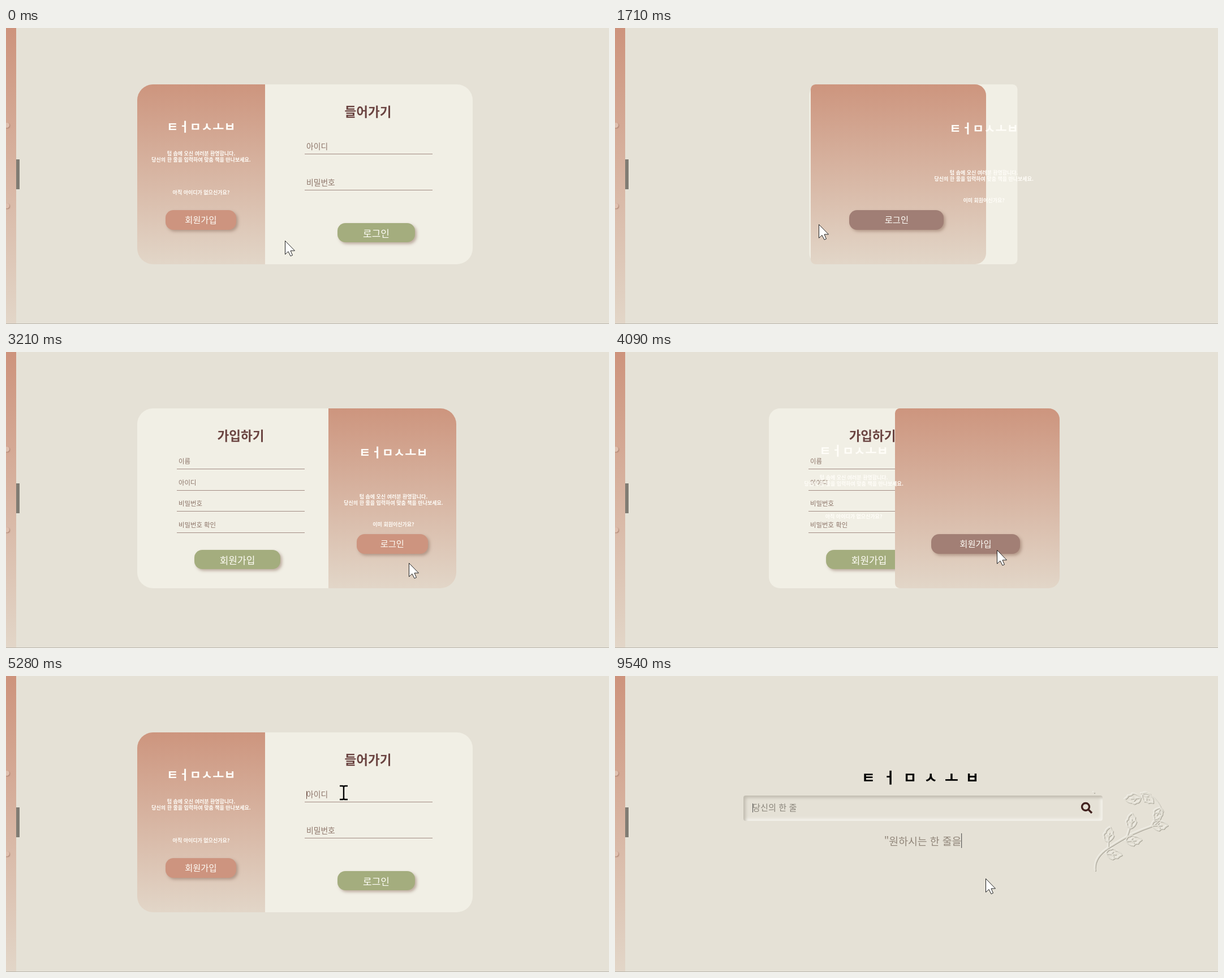
Animation, 1066 px wide and 525 px high, one loop 9570 ms. Source, as an HTML page:

```html
<!DOCTYPE html>
<html lang="ko">
<head>
<meta charset="utf-8">
<title>들어가기</title>
<style>
html, body { margin: 0; width: 100%; height: 100%; overflow: hidden; background: #e5e1d6; }
body { font: 9px/1 "Noto Sans CJK KR", "Noto Sans CJK", sans-serif; }
div, p, i, b, svg { position: absolute; margin: 0; box-sizing: border-box; }
p { white-space: nowrap; transform: translate(-50%, -50%); }
.l { transform: translate(0, -50%); }
#bar { left: 0; top: 0; width: 18px; height: 525px; background: linear-gradient(#cd937c, #e2d6c8); overflow: hidden; }
#bar i { left: -3px; width: 9px; height: 9px; border-radius: 5px; background: #dfbfae; box-shadow: 1px 1px 2px #a87f6d; }
#grip { left: 17.5px; top: 233px; width: 6.5px; height: 53px; background: #807c73; }
#floor { left: 0; top: 524px; width: 1066px; height: 1px; background: #b9b5ab; }
.form, #panel { top: 100px; height: 319px; }
.form { left: 457px; background: #f1efe5; color: #8c7468; }
#login { width: 368px; }
#join { width: 339px; }
#panel { background: linear-gradient(#cd957e, #e2d6c8); }
.head { top: 47px; left: 183px; font-size: 22.5px; font-weight: bold; color: #6a4340; }
.field { left: 71px; width: 226px; height: 1px; background: #a28b83; }
.field p { left: 3px; font-size: 13.8px; }
#join .field { left: 70px; }
#join .field p { font-size: 11.4px; }
.btn { height: 34px; border-radius: 14px; box-shadow: 3px 3px 5px #8a6a5a80; color: #fffdf6; }
.btn p { left: 50%; top: 17px; font-size: 17px; }
.green { background: #a4ad7e; }
#go { left: 22%; width: calc(49% + 15px); top: 223px; height: 35px; }
#go p { font-size: 15.3px; }
.hello { left: 0; top: 0; color: #fffdf8; font-weight: bold; }
.brand { font-size: 22px; font-weight: bold; }
.value { border-right: 1px solid transparent; height: 14px; line-height: 14px; color: #6a4a42; font-family: "Noto Serif", serif; }
#pass { font-family: "Liberation Sans", sans-serif; font-size: 17px; }
#search .brand { left: 436px; top: 179px; font-size: 26px; letter-spacing: 12.8px; color: #000; }
#box { left: 227px; top: 212px; width: 635px; height: 45px; border-radius: 4px;
  box-shadow: inset 4px 4px 5px #c3beb2, inset -4px -4px 5px #f3f1ea; }
#box p { left: 16px; top: 21px; font-size: 15.2px; color: #8a857b; }
#box b { left: 16px; top: 14px; width: 1px; height: 16px; background: #555; }
#typed { left: 544.5px; top: 292px; height: 26px; line-height: 26px; font-size: 18.3px; color: #91867a; border-right: 1px solid #444; }
svg { left: 0; top: 0; overflow: visible; }
#sprig { fill: none; stroke: #e2dfd4; stroke-width: 2; stroke-linecap: round; stroke-linejoin: round;
  filter: drop-shadow(1px 1.5px .7px #aaa69a) drop-shadow(-1px -1px .7px #f2f0e9); }
</style>
</head>
<body>
<div id="bar"><i style="top:168px"></i><i style="top:311px"></i></div>
<div id="grip"></div>
<div id="floor"></div>

<div id="card">
  <div class="form" id="login">
    <p class="head">들어가기</p>
    <div class="field" style="top:123px"><p class="l" style="top:-13px" id="idHint">아이디</p><p class="l value" style="top:-12px" id="user"></p></div>
    <div class="field" style="top:187px"><p class="l" style="top:-13px" id="passHint">비밀번호</p><p class="l value" style="top:-12px" id="pass"></p></div>
    <div class="btn green" id="enter" style="left:129px;top:246px;width:137px"><p>로그인</p></div>
  </div>
  <div class="form" id="join">
    <p class="head">가입하기</p>
    <div class="field" style="top:107px"><p class="l" style="top:-13px">이름</p></div>
    <div class="field" style="top:145px"><p class="l" style="top:-13px">아이디</p></div>
    <div class="field" style="top:182px"><p class="l" style="top:-13px">비밀번호</p></div>
    <div class="field" style="top:220px"><p class="l" style="top:-13px">비밀번호 확인</p></div>
    <div class="btn green" style="left:101px;top:251px;width:152px"><p>회원가입</p></div>
  </div>
  <div id="panel"><div class="btn" id="go"><p id="goText"></p></div></div>
  <div class="hello" id="helloLeft">
    <p class="brand" style="top:173px">ㅌㅓㅁㅅㅗㅂ</p>
    <p style="top:222px">텀 솝에 오신 여러분 환영합니다.</p>
    <p style="top:233px">당신의 한 줄을 입력하여 맞춤 책을 만나보세요.</p>
    <p style="top:291px">아직 아이디가 없으신가요?</p>
  </div>
  <div class="hello" id="helloRight">
    <p class="brand" style="top:176px">ㅌㅓㅁㅅㅗㅂ</p>
    <p style="top:256px">텀 솝에 오신 여러분 환영합니다.</p>
    <p style="top:267px">당신의 한 줄을 입력하여 맞춤 책을 만나보세요.</p>
    <p style="top:305px">이미 회원이신가요?</p>
  </div>
</div>

<div id="search">
  <p class="l brand">ㅌㅓㅁㅅㅗㅂ</p>
  <div id="box"><p class="l">당신의 한 줄</p><b id="boxCaret"></b></div>
  <p id="typed"></p>
  <svg width="1066" height="525">
    <g fill="none" stroke="#42221f" stroke-width="3.4"><circle cx="832" cy="232" r="6.5"/><path d="M837 237l6 6"/></g>
    <g id="sprig">
      <path d="M849 345Q846 322 872 305T915 280T950 266M950 266Q975 250 962 228T930 208M872 305L872 290M905 285L912 262M846 206l1 1"/>
    </g>
  </svg>
</div>

<svg width="1066" height="525"><g id="cursor" stroke-linejoin="round">
  <path id="arrow" fill="#fff" stroke="#222" transform="translate(-.5 -.5)" d="M0 0V24L5.5 19L9.5 27L13 25.5L9.5 17.5H17Z"/>
  <path id="hand" fill="#fff" stroke="#222" stroke-width="1.2" d="M-2 1Q0-2 2 1V12V9Q4 6 6 9V12V10Q8 7 10 10V13V11Q13 9 15 13V22Q15 32 6 32H4Q-1 31-4 24L-8 18Q-7 14-2 18ZM6 12V15M10 13V16"/>
  <path id="beam" fill="none" stroke="#000" stroke-width="2.4" d="M-7-12H-2Q0-12 0-9Q0-12 2-12H7M0-10V10M-7 12H-2Q0 12 0 9Q0 12 2 12H7"/>
</g></svg>

<script>
const LOOP = 9570, TO_JOIN = 1507, TO_LOGIN = 3990, SEARCH = 8400;
const LAG = 73, SWAP = 300; // delay of the panel's trailing edge, time until the forms swap
const NAME = 'naruvo', PHRASE = '"원하시는 한 줄을';
const nameKeys = [5840, 6050, 6210, 6320, 6440, 6610];
const passKeys = [6990, 7090, 7190];
const focusId = 5200, focusPass = 6740;

// time, x, y of the pointer's hot spot
const path = [[0, 494, 378], [630, 494, 378], [1050, 361, 349], [2220, 361, 349], [2700, 500, 419],
  [3180, 713, 375], [3240, 713, 375], [3460, 676, 352], [4400, 676, 352], [4910, 597, 207],
  [7540, 597, 207], [7620, 634, 226], [7950, 656, 360], [LOOP, 656, 360]];
const shapes = [[0, 'arrow'], [870, 'hand'], [1690, 'arrow'], [3390, 'hand'], [4060, 'arrow'], [4335, 'hand'],
  [4500, 'arrow'], [4750, 'beam'], [7680, 'arrow'], [7870, 'hand'], [SEARCH, 'arrow']];
// rotation, x, y and size of each leaf
const leaves = [[5, 868, 315, 1], [-80, 871, 294, .95], [-5, 903, 293, 1], [-85, 912, 270, .95],
  [0, 949, 265, 1], [175, 929, 216, 1], [40, 932, 209, .9], [120, 965, 234, .85]];

const $ = id => document.getElementById(id);
const clamp = x => Math.min(1, Math.max(0, x));
const show = (id, on) => $(id).style.display = on ? '' : 'none';
const count = (keys, t) => keys.filter(k => k <= t).length;

// CSS "ease"
function ease(x) {
  x = clamp(x);
  let lo = 0, hi = 1, s;
  for (let i = 0; i < 20; i++) {
    s = (lo + hi) / 2;
    if (.75 * s * (1 - s) + s ** 3 < x) lo = s; else hi = s;
  }
  return .3 * s * (1 - s) ** 2 + 3 * s * s * (1 - s) + s ** 3;
}

const hover = (t, ...spans) => spans.reduce((sum, [a, b]) => sum + ease((t - a) / 300) - ease((t - b) / 300), 0);
const mix = (a, b, k) => `rgb(${a.map((v, i) => v + (b[i] - v) * k)})`;
const DARK = [157, 125, 116];

function drawCard(t) {
  const shift = (dur, lagIn = 0, lagOut = 0) =>
    ease((t - TO_JOIN - lagIn) / dur) - ease((t - TO_LOGIN - lagOut) / dur);
  const left = 232 + 338.5 * shift(600, LAG, 0);
  const right = 457.5 + 338.5 * shift(600, 0, LAG);
  const r = 28 * shift(500), l = 28 - r;
  const joining = t >= TO_JOIN && t < TO_LOGIN;
  const joinForm = t >= TO_JOIN + SWAP && t < TO_LOGIN + SWAP;

  const panel = $('panel').style;
  panel.left = left + 'px';
  panel.width = right - left + 'px';
  panel.borderRadius = `${l}px ${r}px ${r}px ${l}px`;
  for (const id of ['login', 'join']) {
    $(id).style.transform = `translateX(${-225 * shift(690)}px)`;
    $(id).style.borderRadius = `${r}px ${l}px ${l}px ${r}px`;
  }
  show('join', joinForm);
  show('login', !joinForm);
  show('helloLeft', !joining);
  show('helloRight', joining);
  $('helloLeft').style.left = 345 + .235 * (right - 457.5) + 'px';
  $('helloRight').style.left = 685 + .235 * (right - 796) + 'px';
  $('goText').textContent = joining ? '로그인' : '회원가입';
  $('go').style.background = mix([205, 148, 127], DARK, hover(t, [870, 1690], [3390, 4060]));
  $('enter').style.background = mix([164, 173, 126], DARK, hover(t, [4335, 4500], [7870, LOOP]));

  const typed = count(nameKeys, t), dots = count(passKeys, t);
  const last = Math.max(...[focusId, focusPass, ...nameKeys, ...passKeys].filter(k => k <= t));
  const lit = (t - last) % 1000 < 500 ? '#6a4a42' : 'transparent';
  $('user').textContent = NAME.slice(0, typed);
  $('pass').textContent = '•'.repeat(dots);
  $('user').style.borderColor = t >= focusId && t < focusPass ? lit : 'transparent';
  $('pass').style.borderColor = t >= focusPass ? lit : 'transparent';
  show('idHint', !typed);
  show('passHint', !dots);
}

function drawSearch(t) {
  const n = Math.floor((t - 8560) / 97) + 1;
  $('typed').textContent = PHRASE.slice(0, Math.max(0, n));
  show('typed', n > 0);
  show('boxCaret', t >= 8560 && Math.floor((t - 8560) / 490) % 2 === 0);
}

function drawCursor(t) {
  const i = Math.max(1, path.findIndex(p => p[0] > t));
  const [a, b] = [path[i - 1], path[i]];
  const u = (t - a[0]) / (b[0] - a[0]), k = u * u * (3 - 2 * u);
  const at = j => Math.round(a[j] + (b[j] - a[j]) * k);
  $('cursor').setAttribute('transform', `translate(${at(1)} ${at(2)})`);
  const shape = shapes[count(shapes.map(s => s[0]), t) - 1][1];
  for (const id of ['arrow', 'hand', 'beam']) show(id, id === shape);
}

$('sprig').innerHTML += leaves.map(([turn, x, y, size]) =>
  `<path transform="translate(${x} ${y}) rotate(${turn}) scale(${size})"
    d="M0 0Q2-9 8-8Q12-12 16-7Q22-8 28 0Q23 2 21 6Q15 5 13 9Q5 8 0 0L17 0M8 0l4-4M10 0l4 4"/>`).join('');

const start = performance.now();
function frame(now) {
  const t = Math.max(0, now - start) % LOOP;
  show('card', t < SEARCH);
  show('search', t >= SEARCH);
  if (t < SEARCH) drawCard(t); else drawSearch(t);
  drawCursor(t);
  requestAnimationFrame(frame);
}
frame(start);
</script>
</body>
</html>
```
